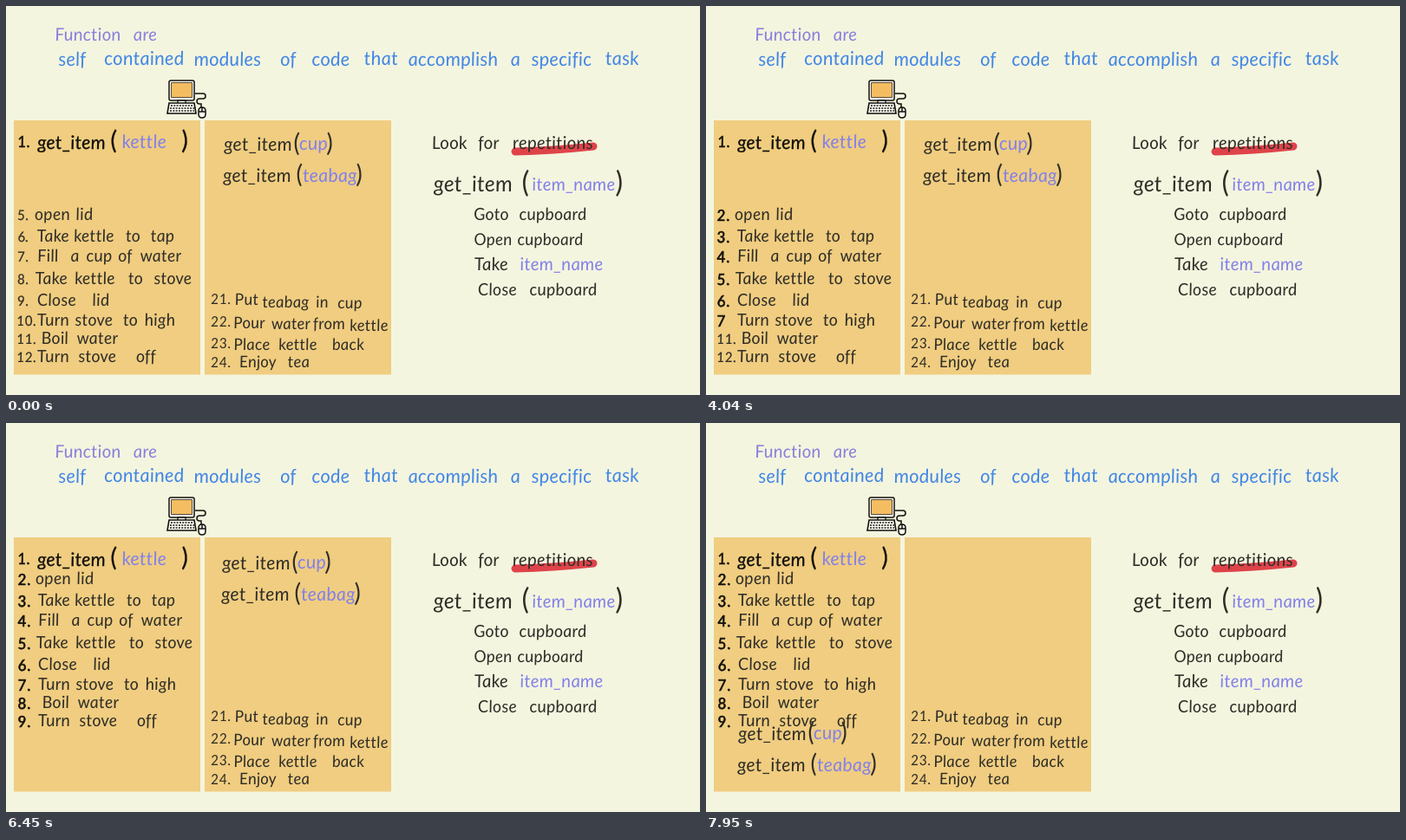
An HTML page with a canvas for the animation above (8 s loop, 800 by 449 pixels).

```html
<!DOCTYPE html>
<html lang="en">
<head>
<meta charset="utf-8">
<title>Functions</title>
<style>
html, body { margin: 0; width: 100%; height: 100%; overflow: hidden; background: #f4f5df; }
canvas { display: block; width: 800px; height: 449px; }
</style>
</head>
<body>
<canvas width="800" height="449"></canvas>
<script>
const ctx = document.querySelector('canvas').getContext('2d');
const LOOP = 8000, STEP = 250 / 3;
const INK = '#302e28', BLACK = '#11100c', LAVENDER = '#8381ea', BLUE = '#4287e5';

// Steps with old and new number and the spans in which one is erased and the other written.
const steps = [
  { y: 247, words: '54:open 91:lid', old: '5.', no: 2, erase: [0, 40], write: [460, 700] },
  { y: 272, words: '55:Take 102:kettle 147:to 181:tap', old: '6.', no: 3, erase: [790, 950], write: [1040, 1370] },
  { y: 295, words: '49:Fill 80:a 108:cup 138:of 179:water', old: '7.', no: 4, erase: [1460, 1540], write: [1620, 1950] },
  { y: 321, words: '53:Take 103:kettle 150:to 193:stove', old: '8.', no: 5, erase: [2120, 2540], write: [2540, 2700] },
  { y: 346, words: '59:Close 110:lid', old: '9.', no: 6, erase: [2790, 3040], write: [3210, 3450] },
  { y: 369, words: '55:Turn 102:stove 144:to 178:high', old: '10.', no: 7, erase: [3540, 3700], write: [3790, 4200] },
  { y: 390, words: '57:Boil 106:water', old: '11.', no: 8, erase: [4200, 4370], write: [4540, 4870] },
  { y: 411, words: '55:Turn 106:stove 162:off', old: '12.', no: 9, erase: [4960, 5120], write: [5290, 5620] },
];
const listPath = [[6040, 0, 0], [6120, 1.5, -21], [6370, 1, -61]];
const callPath = [[6370, 0, 0], [6450, -2, 2], [6710, -2, 2], [7200, -150, 65], [7540, -205, 148], [7950, -214, 199]];

const progress = (t, [from, to]) => Math.min(1, Math.max(0, (t - from) / (to - from)));

function along(path, t) {
  let [, x, y] = path[0];
  for (let i = 1; i < path.length; i++) {
    const p = progress(t, [path[i - 1][0], path[i][0]]);
    x += (path[i][1] - path[i - 1][1]) * p;
    y += (path[i][2] - path[i - 1][2]) * p;
  }
  return [x, y];
}

function glyphs(text, x, y, size, color, heavy = 0) {
  ctx.save();
  // An italic set nearly upright gives rounder, handwritten letter shapes.
  ctx.transform(1, 0, 0.1, 1, x, y);
  ctx.font = `italic ${size}px Lato, "Open Sans", sans-serif`;
  ctx.letterSpacing = '0.2px';
  ctx.textAlign = 'center';
  ctx.fillStyle = ctx.strokeStyle = color;
  ctx.fillText(text, 0, 0);
  if (heavy) {
    ctx.lineWidth = heavy;
    ctx.strokeText(text, 0, 0);
  }
  ctx.restore();
}

// Words are "centre:text" or "centre:text:drop"; "~" marks an argument.
function write(y, size, words, color = INK, heavy = 0) {
  for (const word of words.split(' ')) {
    const [x, raw, drop = 0] = word.split(':');
    const text = raw.replace('~', '');
    const paren = /^[()]$/.test(text);
    glyphs(text, +x, y + +drop + (paren ? 1 : 0), paren ? size * 1.35 : size,
      raw === text ? color : LAVENDER, heavy);
  }
}

function shape(path, fill, width, color = BLACK) {
  const p = new Path2D(path);
  if (fill) { ctx.fillStyle = fill; ctx.fill(p); }
  if (width) { ctx.lineWidth = width; ctx.strokeStyle = color; ctx.stroke(p); }
}

function computer() {
  shape('M190 86H215Q217 86 217 88V107Q217 109 215 109H190Q188 109 188 107V88Q188 86 190 86Z', '#fffdf4', 1.5);
  shape('M190.5 88.5H214.5V105.5H190.5Z', '#f5bd62', 0.7);
  shape('M198 109H207V113H198Z', '#fff', 1.3);
  shape('M188 112H217L219 124H186Z', '#fffdf4', 1.6);
  ctx.setLineDash([2, 1.3]);
  shape('M190 115H216M189 118H217M189 121H217', null, 1.7);
  ctx.setLineDash([]);
  shape('M218 101H227Q230 101 230 104Q230 107 227 107H223Q220 107 220 110Q220 113 223 113H225V118', null, 1.5);
  shape('M226 117Q230 117 230 121V125Q230 129 226 129Q222 129 222 125V121Q222 117 226 117ZM222 122H230M226 117V122', '#fffdf4', 1.5);
}

function board() {
  ctx.fillStyle = '#f4f5df';
  ctx.fillRect(0, 0, 800, 449);
  ctx.fillStyle = '#f0cd80';
  ctx.fillRect(9, 132, 215, 293.5);
  ctx.fillRect(229, 132, 215, 293.5);
  computer();

  write(40, 20.5, '95:Function 161:are', '#8a80dc');
  write(69, 22, '77:self 160:contained:-1 256:modules 326:of 375:code 433:that:-1 516:accomplish 588:a 641:specific 711:task:-1', BLUE);

  write(163, 18, '21:1.', BLACK, 0.45);
  write(164, 21.5, '76:get_item:1 125:( 207:)', BLACK, 0.3);
  write(164, 21.5, '160:~kettle');

  write(346, 18.5, '278:Put:-1 323:teabag:2 365:in:2 397:cup:3');
  write(373, 18.5, '281:Pour:-1 329:water 373:from 419:kettle:2');
  write(397, 18.5, '284:Place 337:kettle 395:back');
  write(417, 18.5, '291:Enjoy 338:tea');
  [[21, 344], [22, 370], [23, 395], [24, 417]].forEach(([n, y]) => glyphs(n + '.', 248, y, 16.5, INK));

  ctx.lineCap = 'round';
  shape('M587 168Q630 167 677 162', null, 9, '#df434a');
  ctx.lineCap = 'butt';
  write(165, 20.5, '512:Look 557:for 631:repetitions');
  write(214, 25, '539:get_item 600:( 708:)');
  write(213, 20.5, '655:~item_name');
  write(247, 19.5, '560:Goto 631:cupboard');
  write(276, 19, '562:Open 628:cupboard');
  write(305, 20.5, '560:Take 641:~item_name');
  write(334, 19.5, '567:Close 643:cupboard');
}

function clipped(top, height, paint) {
  ctx.save();
  ctx.beginPath();
  ctx.rect(0, top, 40, height);
  ctx.clip();
  paint();
  ctx.restore();
}

// The digit is written first; its dot follows when the span ends.
function stepNumber(t, { y, old, no, erase, write: span }) {
  const gone = progress(t, erase), drawn = progress(t, span);
  const top = y - 15;
  if (gone < 1) {
    const x = old.length > 2 ? 24 : 20;
    clipped(top + 17 * gone, 40, () => glyphs(old, x, y, 16, INK, 0.2));
  }
  if (drawn > 0) {
    clipped(top, 30 * drawn, () => glyphs(no, 18, y + 1, 18, BLACK, 0.6));
    if (drawn === 1) glyphs('.', 26, y + 1, 18, BLACK, 0.6);
  }
}

function stepList(t) {
  ctx.save();
  ctx.translate(...along(listPath, t));
  for (const step of steps) {
    write(step.y, 19.5, step.words);
    stepNumber(t, step);
  }
  ctx.restore();
}

function calls(t) {
  ctx.save();
  ctx.translate(...along(callPath, t));
  write(167, 21.5, '291:get_item 336:( 355:~cup:-1 374:)');
  write(203, 21.5, '290:get_item 339:( 374:~teabag 408:)');
  ctx.restore();
}

function frame(now) {
  const time = now % LOOP;
  // Picture times are kept to whole hundredths, so each step may begin a little early.
  const t = time < 40 ? 0 : 40 + Math.floor((time - 32) / STEP) * STEP;
  board();
  stepList(t);
  calls(t);
  requestAnimationFrame(frame);
}
requestAnimationFrame(frame);
</script>
</body>
</html>
```
